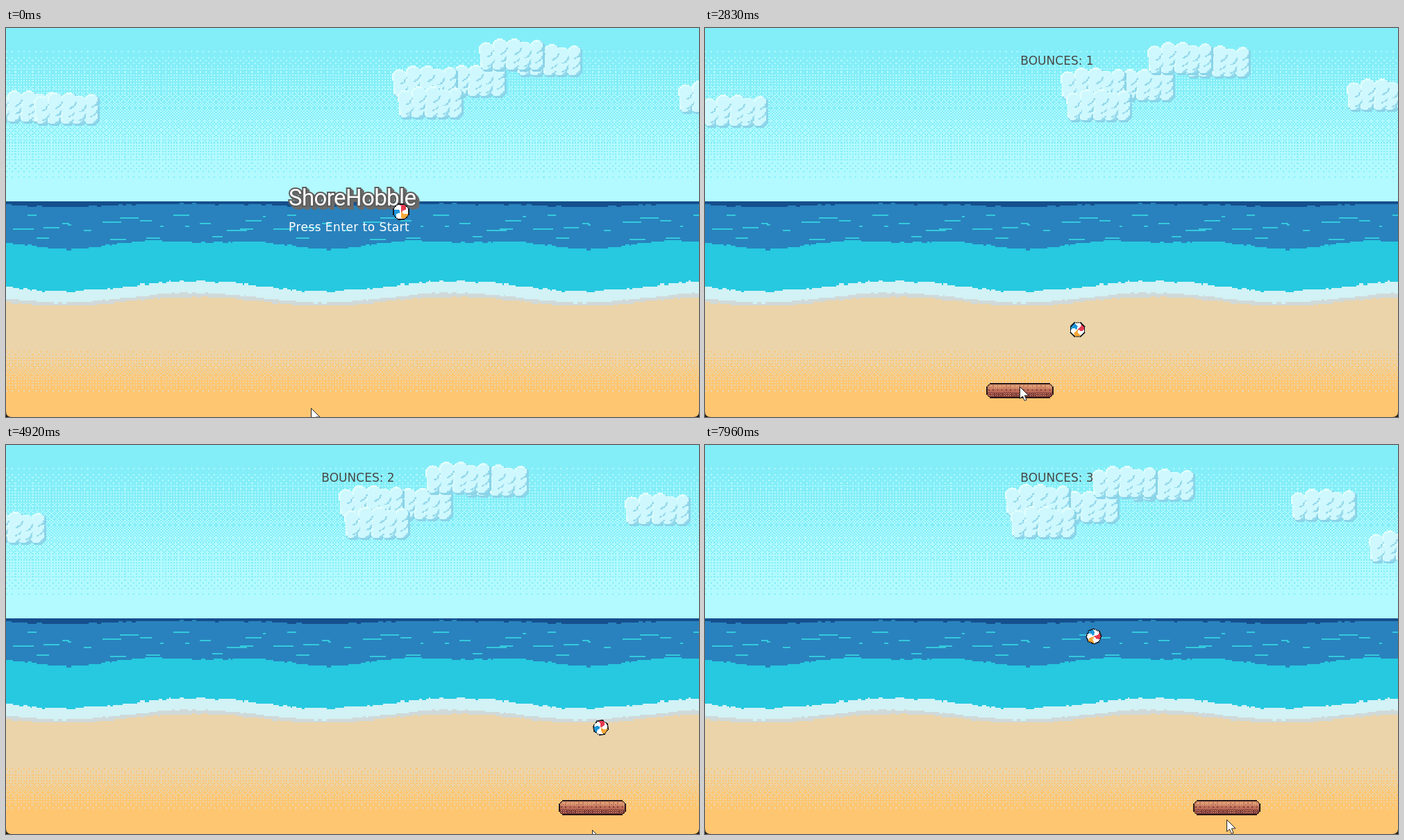
These frames come from a looping animation (998x561 px, 8000 ms). An HTML page with a canvas:

```html
<!DOCTYPE html>
<html lang="en">
<head>
<meta charset="utf-8">
<title>Beach game</title>
<style>
html, body { margin: 0; width: 100%; height: 100%; overflow: hidden; }
body { position: relative; background: #84eef8; }
canvas, svg { position: absolute; left: 0; top: 0; width: 998px; height: 561px; }
#title { font: 33px Roboto, sans-serif; letter-spacing: -.6px; fill: #fff; stroke: #5c5c5c; stroke-width: 4px;
  paint-order: stroke; filter: drop-shadow(2px 2px 0 #6a6a6a) drop-shadow(2px 2px 0 #6a6a6a); }
#prompt { font: 17px "DejaVu Sans", sans-serif; letter-spacing: .45px; fill: #fff; }
#score { font: 17px "DejaVu Sans", sans-serif; fill: #484848; text-anchor: middle; }
</style>
</head>
<body>
<canvas id="back" width="998" height="561"></canvas>
<svg viewBox="0 0 998 561">
  <g id="menu">
    <text id="title" x="407" y="256">ShoreHobble</text>
    <text id="prompt" x="407" y="293">Press Enter to Start</text>
  </g>
  <text id="score" x="507" y="53"></text>
</svg>
<canvas id="front" width="998" height="561"></canvas>
<svg viewBox="0 0 998 561"><path fill="#1b1b1b" d="M0 553Q0 561 8 561H0ZM998 553Q998 561 990 561H998Z"/></svg>
<script>
const TAU = 2 * Math.PI;
const byId = id => document.getElementById(id);
const context = id => {
  const c = byId(id).getContext('2d');
  c.imageSmoothingEnabled = false;
  return c;
};
const back = context('back'), front = context('front');

function seeded(seed) {
  return () => (seed = (seed * 16807) % 2147483647) / 2147483647;
}

// Builds a pixel-art canvas; colorAt gives 0xRRGGBB or undefined for empty.
function sprite(w, h, colorAt) {
  const canvas = document.createElement('canvas');
  canvas.width = w;
  canvas.height = h;
  const c = canvas.getContext('2d'), image = c.createImageData(w, h);
  for (let y = 0; y < h; y++) for (let x = 0; x < w; x++) {
    const color = colorAt(x, y);
    if (color !== undefined)
      image.data.set([color >> 16, color >> 8 & 255, color & 255, 255], (y * w + x) * 4);
  }
  c.putImageData(image, 0, 0);
  return canvas;
}

// Ordered 4x4 dither
function dither(x, y, amount, from, to) {
  const d = x ^ y, rank = (d & 1) << 3 | (y & 1) << 2 | d & 2 | (y & 2) >> 1;
  return amount * 16 > rank + .5 ? to : from;
}

// Background: a wavy tile, repeated across the stage
const TILE = 180, DOT = 562 / 270;
const rand = seeded(77);
function shoreline(mean, swell, chop, rough) {
  let bump = 0;
  return Array.from({ length: TILE }, (_, x) => {
    const a = TAU * (x / TILE + .03);
    if (x % 3 === 0) bump = (rand() - .5) * rough;
    return mean + swell * Math.sin(a) - chop * Math.cos(2 * a - .4) + bump;
  });
}
const deep = shoreline(255.5, 2.2, .5, 2);
const blue = shoreline(311.5, 5, 2.7, 1.5);
const shallow = shoreline(372.3, 7.2, 0, 3);
const foam = shoreline(389, 7.3, 0, 2);
const wet = shoreline(394, 6.2, 0, 1.5);

const RIPPLES = 21;
const ripples = Array.from({ length: RIPPLES }, (_, i) => {
  const start = Math.floor((i + rand()) * TILE / RIPPLES);
  return { start, end: start + 2 + Math.floor(rand() * 13), row: 128 + Math.floor(rand() * 20) };
});

const scenery = sprite(480, 270, (x, row) => {
  const tx = x % TILE, y = (row + .5) * DOT;
  if (row < 120) return dither(x, row, (y - 25) / 200, 0x84eef8, 0xb2faff);
  if (y < deep[tx]) return 0x154f8d;
  if (y < blue[tx])
    return ripples.some(r => row === r.row && tx >= r.start && tx < r.end) ? 0x35c9de : 0x2982bd;
  if (y < shallow[tx]) return 0x26c9e0;
  if (y < foam[tx]) return 0xd2f2f5;
  if (y < wet[tx]) return 0xd0d9d9;
  return dither(x, row, (y - 457) / 76, 0xebd4aa, 0xffc671);
});

// Cloud: three rows of round puffs, the upper ones in front
const puffs = [];
for (let row = 0; row < 3; row++) for (let i = 0; i < 5; i++) {
  const radius = 6 + rand() * 2;
  puffs.push({
    x: Math.min(8 + i * 11 + (rand() - .5) * 4, 59 - radius),
    y: row < 2 ? 12 - Math.sin(i * 1.05) ** 2 * 4 + row * 8 : 31 - radius,
    radius
  });
}
const puffAt = (x, y) => puffs.find(p => Math.hypot(x - p.x, y - p.y) < p.radius);
const cloud = sprite(61, 34, (x, y) => {
  const puff = puffAt(x, y);
  if (!puff) return puffAt(x - 1, y - 2) || puffAt(x - 2, y - 1) ? 0x8ad3e8 : undefined;
  const dx = x - puff.x, dy = y - puff.y, rim = Math.hypot(dx, dy) > puff.radius - 1.5;
  if (rim && dx + dy > puff.radius) return 0x97daec;
  return rim && dx + dy < -puff.radius * .3 ? 0xe2fefc : 0xcef8fe;
});

const plank = sprite(62, 14, (x, y) => {
  const ex = Math.min(x, 61 - x), ey = Math.min(y, 13 - y);
  if (ex + ey < 3) return undefined;
  if (!ex || !ey || ex + ey === 3) return 0x2a1718;
  return y < 6 ? dither(x, y, (y - 1) / 6, 0xdc9a72, 0xbd6c57) : dither(x, y, (y - 5) / 8, 0xbd6c57, 0x773a38);
});

const beachBall = sprite(14, 14, (x, y) => {
  const dx = x - 6.5, dy = y - 6.5, r = Math.hypot(dx, dy);
  if (r > 7) return undefined;
  if (r > 6.05) return 0x161a20;
  const sector = (Math.atan2(dy, dx) + r * .09 - .3) / TAU * 6;
  return [0xffffff, 0xf8a93a, 0xffffff, 0x1d96da, 0xffffff, 0xe43a50][Math.round(sector + 6) % 6];
});

// Clouds drift left at one speed and bob by a wave that depends on where they start.
const CLOUD_SPEED = 15.6;
const clouds = [[968, 73], [-18, 87], [40, 90], [1080, 115], [626, 50], [556, 51], [564, 81], [735, 20], [681, 12]];
function drawClouds(t) {
  const u = t / 8;
  for (const [startX, startY] of clouds) {
    const phase = TAU * (startX - 545) / 510, x = startX - CLOUD_SPEED * t;
    const y = startY + 15 * Math.sin(phase) * u + 3 * Math.cos(phase) * Math.sin(Math.PI * u);
    if (x > -52) back.drawImage(cloud, Math.round(x), Math.round(y), 95, 53);
  }
}

// Pointer path: time, x, y
const pointerKeys = [[0, 439, 548], [1.29, 460, 534], [2.83, 453, 517], [4.17, 711, 538],
  [4.92, 844, 555], [6.17, 838, 542], [6.71, 947, 539], [8, 750, 540]];
function pointerAt(t, axis) {
  const keys = pointerKeys, last = keys.length - 1;
  let i = 0;
  while (i < last - 1 && keys[i + 1][0] <= t) i++;
  const slope = n => n < 0 || n >= last ? 0 : (keys[n + 1][axis] - keys[n][axis]) / (keys[n + 1][0] - keys[n][0]);
  const tangent = n => {
    const p = slope(n - 1), q = slope(n);
    return p * q > 0 ? 2 * p * q / (p + q) : 0;
  };
  const span = keys[i + 1][0] - keys[i][0], k = (t - keys[i][0]) / span, j = 1 - k;
  return keys[i][axis] * j * j * (1 + 2 * k) + keys[i + 1][axis] * k * k * (3 - 2 * k)
    + span * k * j * (tangent(i) * j - tangent(i + 1) * k);
}

// Ball: every bounce kicks it up equally hard and sets a new sideways speed.
const START = 1.71, FIRST_BOUNCE = 2.683, GRAVITY = 472, KICK = 475, FLOOR = 501, WALL = 987, HOME = 489;
const PERIOD = 2 * KICK / GRAVITY;
const speeds = [316, 34.3, -286.5];
const reflect = x => x > WALL ? 2 * WALL - x : x;
function ballAt(t) {
  if (t < FIRST_BOUNCE) return { count: 0, x: HOME, y: 280 + GRAVITY * (t - START) ** 2 / 2 };
  const count = 1 + Math.floor((t - FIRST_BOUNCE) / PERIOD), s = (t - FIRST_BOUNCE) % PERIOD;
  let x = HOME;
  for (let i = 0; i < count; i++) x = reflect(x + speeds[i] * (i === count - 1 ? s : PERIOD));
  return { count, x, y: FLOOR - KICK * s + GRAVITY * s * s / 2 };
}
function drawBall(x, y, size, angle) {
  front.save();
  front.translate(x, y);
  front.rotate(angle);
  front.drawImage(beachBall, -size / 2, -size / 2, size, size);
  front.restore();
}

const arrow = new Path2D('M.5 .5V17.5L4.5 14L7.2 20.5L10 19.3L7.3 13H13Z');
function drawPointer(x, y) {
  front.save();
  front.translate(Math.round(x), Math.round(y));
  front.fillStyle = '#fff';
  front.strokeStyle = '#222';
  front.fill(arrow);
  front.stroke(arrow);
  front.restore();
}

function render(t) {
  const playing = t >= START, px = pointerAt(t, 1);
  back.drawImage(scenery, 0, 0, 998, 562);
  drawClouds(t);
  front.clearRect(0, 0, 998, 561);
  byId('menu').style.display = playing ? 'none' : '';
  if (playing) {
    const ball = ballAt(t);
    byId('score').textContent = 'BOUNCES: ' + ball.count;
    front.drawImage(plank, Math.round(px - 48), 512, 97, 22);
    drawBall(ball.x, ball.y, 22, (ball.x - HOME) / 60);
  } else {
    byId('score').textContent = '';
    drawBall(569, 265, 24, 0);
  }
  drawPointer(px, pointerAt(t, 2));
}

const FPS = 24, began = performance.now();
function tick() {
  const ms = (performance.now() - began) % 8000;
  render(Math.floor((ms + 5) * FPS / 1000) / FPS);
  requestAnimationFrame(tick);
}
tick();
</script>
</body>
</html>
```
